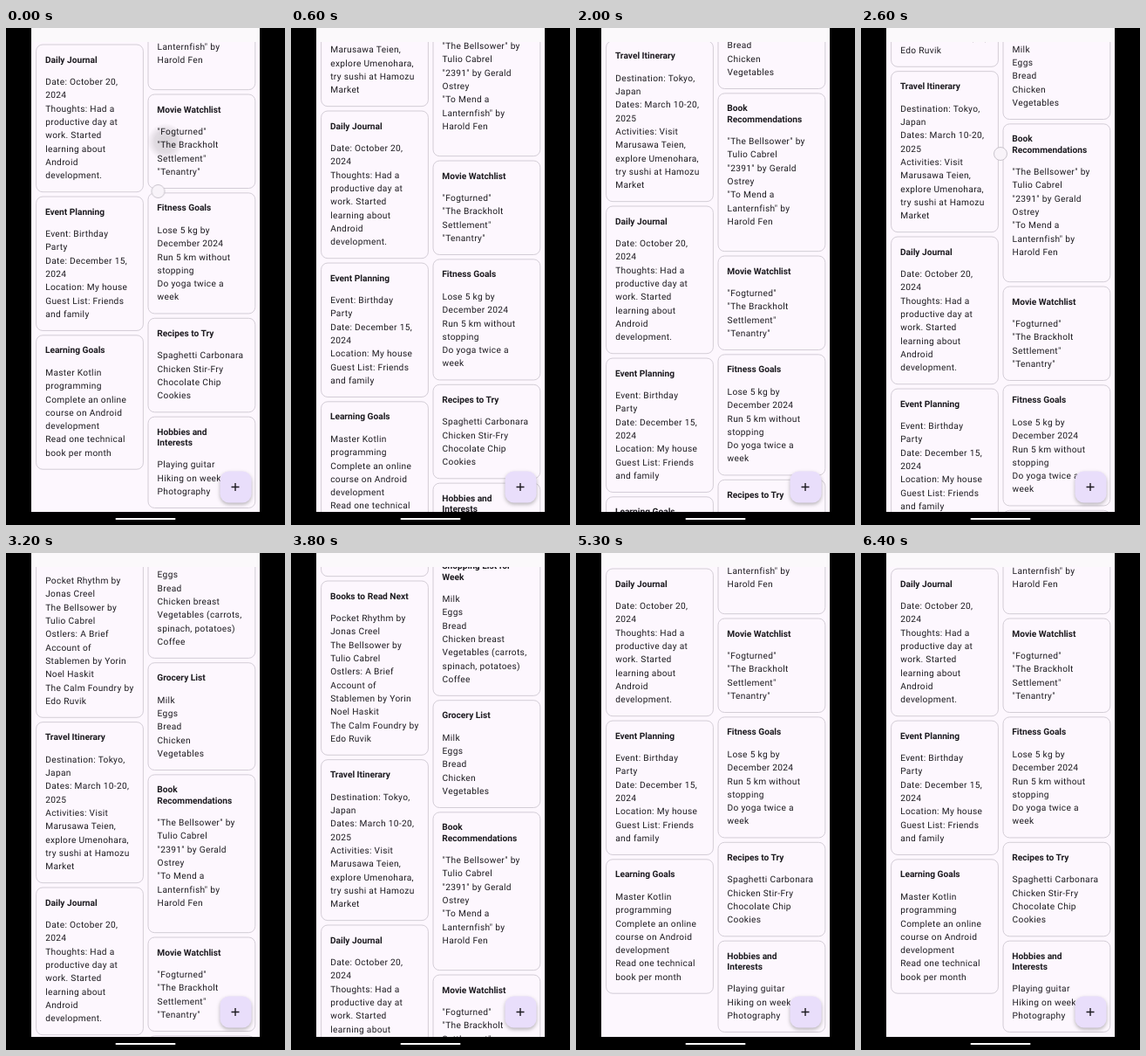
An HTML page for the animation above (6500 ms loop, 320 px wide and 569 px high).

```html
<!DOCTYPE html>
<html lang="en">
<head>
<meta charset="utf-8">
<title>Notes</title>
<style>
  html, body { margin: 0; width: 100%; height: 100%; overflow: hidden; background: #000; }
  svg { display: block; width: 320px; height: 569px; }
  text { font: 10.18px Roboto, sans-serif; fill: #1d1b20; white-space: pre; text-rendering: geometricPrecision; }
  .title { font-weight: 700; }
  .body { letter-spacing: .32px; }
  .card { fill: #fdf7fe; stroke: #c8c2cc; stroke-width: .8; }
  .touch { fill: #f8f3f9; stroke: #bdb8c0; stroke-width: .8; }
  .fab { fill: #e9defb; filter: drop-shadow(0 2.5px 2px rgba(0, 0, 0, .28)); }
</style>
</head>
<body>
<svg viewBox="0 0 320 569">
  <defs>
    <clipPath id="view"><rect x="29" y="16" width="262" height="538"/></clipPath>
    <radialGradient id="press">
      <stop offset="0" stop-color="#000" stop-opacity=".15"/>
      <stop offset=".6" stop-color="#000" stop-opacity=".11"/>
      <stop offset="1" stop-color="#000" stop-opacity="0"/>
    </radialGradient>
  </defs>
  <rect width="320" height="569" fill="#000"/>
  <rect x="29" width="262" height="554" fill="#fdf7fe"/>
  <rect x="29" width="262" height="16" fill="#fbf9fb"/>
  <g clip-path="url(#view)">
    <g id="list"></g>
    <circle id="ripple" cx="183" cy="130" r="21" fill="url(#press)"/>
    <circle id="touch" class="touch" r="7.5"/>
  </g>
  <rect class="fab" x="245.5" y="507.5" width="36" height="36" rx="10.2"/>
  <path d="M258.5 525.5h9M263 521v9" stroke="#1d1b20" stroke-width="1.4"/>
  <rect x="125.5" y="561" width="69" height="2" rx="1" fill="#fff"/>
</svg>
<script>
const LOOP = 6500;
const LINE = 15.3, TITLE_LINE = 12.1, GAP = 5.35;

// Each note: title lines, then body lines; "|" breaks a line.
const left = [
  ['', '||'],
  ['Books to Read Next', 'Pocket Rhythm by|Jonas Creel|The Bellsower by|Tulio Cabrel|Ostlers: A Brief|Account of|Stablemen by Yorin|Noel Haskit|The Calm Foundry by|Edo Ruvik'],
  ['Travel Itinerary', 'Destination: Tokyo,|Japan|Dates: March 10-20,|2025|Activities: Visit|Marusawa Teien,|explore Umenohara,|try sushi at Hamozu|Market'],
  ['Daily Journal', 'Date: October 20,|2024|Thoughts: Had a|productive day at|work. Started|learning about|Android|development.'],
  ['Event Planning', 'Event: Birthday|Party|Date: December 15,|2024|Location: My house|Guest List: Friends|and family'],
  ['Learning Goals', 'Master Kotlin|programming|Complete an online|course on Android|development|Read one technical|book per month'],
];
const right = [
  ['Shopping List for|Week', 'Milk|Eggs|Bread|Chicken breast|Vegetables (carrots,|spinach, potatoes)|Coffee'],
  ['Grocery List', 'Milk|Eggs|Bread|Chicken|Vegetables'],
  ['Book|Recommendations', '"The Bellsower" by|Tulio Cabrel|"2391" by Gerald|Ostrey|"To Mend a|Lanternfish" by|Harold Fen|'],
  ['Movie Watchlist', '"Fogturned"|"The Brackholt|Settlement"|"Tenantry"'],
  ['Fitness Goals', 'Lose 5 kg by|December 2024|Run 5 km without|stopping|Do yoga twice a|week'],
  ['Recipes to Try', 'Spaghetti Carbonara|Chicken Stir-Fry|Chocolate Chip|Cookies'],
  ['Hobbies and|Interests', 'Playing guitar|Hiking on weekends|Photography'],
];

const list = document.getElementById('list');

function add(tag, attrs, content = '') {
  const node = document.createElementNS('http://www.w3.org/2000/svg', tag);
  for (const key in attrs) node.setAttribute(key, attrs[key]);
  node.textContent = content;
  list.append(node);
}

function addLines(lines, cls, x, y, step) {
  lines.forEach((line, i) => add('text', { class: cls, x, y: y + i * step }, line));
}

// Columns are stacked upwards from their bottom edge at full scroll.
function addColumn(notes, x, bottom) {
  for (const note of [...notes].reverse()) {
    const [title, body] = note.map(part => part.split('|'));
    const extra = (title.length - 1) * TITLE_LINE;
    const height = 61.6 + extra + (body.length - 1) * LINE;
    const top = bottom - height;
    add('rect', { class: 'card', x, y: top, width: 122.8, height, rx: 7.4 });
    addLines(title, 'title', x + 10.3, top + 20.6, TITLE_LINE);
    addLines(body, 'body', x + 10.6, top + 46.1 + extra, LINE);
    bottom = top - GAP;
  }
}

addColumn(left, 34.6, 504.2);
addColumn(right, 163, 548.45);

// Scroll runs: start time, then the offset at every 100 ms; held until the next run.
const runs = [
  [0, 1, 22], [300, 44, 58, 69, 77], [800, 82, 85, 87],
  [1600, 104, 132, 155, 172, 186, 197, 205, 210, 214], [2600, 221],
  [2800, 262, 294, 322, 346, 365, 379, 389, 396, 402, 406, 408],
  [4400, 385, 325, 262, 214, 182, 164], [5100, 110, 42, 0],
];

// Turns [time, style] pairs into an endless stepped animation.
function playSteps(id, steps) {
  const frames = steps.map(([time, style]) => ({ ...style, offset: time / LOOP, easing: 'step-end' }));
  frames.push({ ...frames[frames.length - 1], offset: 1 });
  document.getElementById(id).animate(frames, { duration: LOOP, iterations: Infinity });
}

const move = (x, y) => ({ transform: `translate(${x}px, ${y}px)` });
const touchAt = (x, y) => ({ ...move(x, y), opacity: 1 });
const hidden = { ...move(160, 144), opacity: 0 };

playSteps('list', runs.flatMap(([start, ...offsets]) =>
  offsets.map((y, i) => [start + i * 100, move(0, y)])));
playSteps('touch', [
  [0, touchAt(174.5, 187)], [100, hidden],
  [1600, touchAt(161.5, 163.5)], [1700, hidden],
  [2600, touchAt(160, 144)], [2800, hidden],
]);
playSteps('ripple', [[0, { opacity: 1 }], [100, { opacity: 0 }]]);
</script>
</body>
</html>
```
